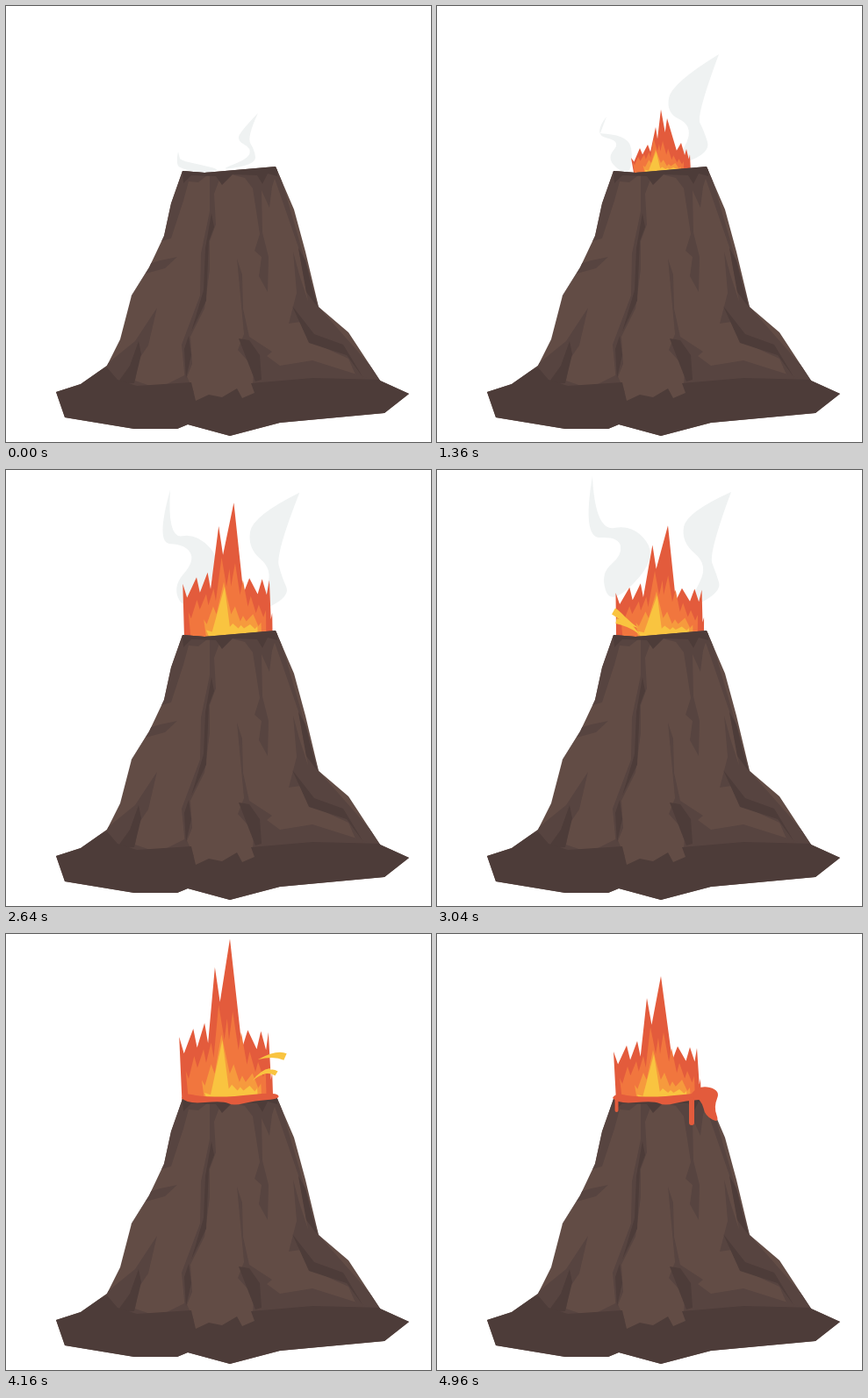
Recreate the animation shown at these times as an HTML page with a canvas. Size 484 px wide and 497 px high, loop 5040 ms.

```html
<!DOCTYPE html>
<html lang="en">
<head>
<meta charset="utf-8">
<title>Volcano</title>
<style>
html, body { margin: 0; width: 100%; height: 100%; overflow: hidden; background: #fff; }
canvas { display: block; }
</style>
</head>
<body>
<canvas id="stage" width="484" height="497"></canvas>
<script>
const ctx = document.getElementById('stage').getContext('2d');
const LOOP = 5040, STEP = 80, BASE = 190;
const RED = '#e35b3c', ORANGE = '#f1763e', AMBER = '#f69a3d', YELLOW = '#f9c440';
const ROCK = '#624c45', SHADE = '#574440', DARK = '#4d3c39', SMOKE = '#eff2f2';

const mix = (a, b, k) => a + (b - a) * k;
const ramp = (t, a, b) => Math.max(0, Math.min(1, (t - a) / (b - a)));
const blend = (a, b, k) => a.map((v, i) => mix(v, b[i], k));

// Blends flat arrays of equal length between key times.
function sample(times, values, t) {
  let i = 0;
  while (i < times.length - 2 && t > times[i + 1]) i++;
  return blend(values[i], values[i + 1], ramp(t, times[i], times[i + 1]));
}

function trace(p) {
  ctx.beginPath();
  for (let i = 0; i < p.length; i += 2) ctx.lineTo(p[i], p[i + 1]);
  ctx.closePath();
}

function poly(color, ...p) {
  ctx.fillStyle = color;
  trace(p);
  ctx.fill();
}

// Smooth outline with one sharp tip at its first point.
function soft(color, p) {
  ctx.fillStyle = color;
  ctx.beginPath();
  ctx.moveTo(p[0], p[1]);
  for (let i = 2; i < p.length - 2; i += 2)
    ctx.quadraticCurveTo(p[i], p[i + 1], (p[i] + p[i + 2]) / 2, (p[i + 1] + p[i + 3]) / 2);
  ctx.quadraticCurveTo(p[p.length - 2], p[p.length - 1], p[0], p[1]);
  ctx.fill();
}

// Mountain
const outline = [201,188, 226,190, 307,183, 328,232, 341,280, 356,343, 390,372, 426,427,
  459,442, 431,464, 312,475, 255,490, 207,477, 195,482, 146,482, 67,469, 57,440, 85,431,
  115,410, 130,380, 143,330, 163,298, 180,262, 188,225];

function drawMountain() {
  ctx.save();
  trace(outline);
  ctx.fillStyle = ROCK;
  ctx.fill();
  ctx.clip();
  // Broad folds
  poly(SHADE, 195,180, 233,190, 219,201, 208,200, 202,222, 188,265, 170,270);
  poly(SHADE, 232,190, 246,190, 237,214, 239,249, 232,268, 232,300, 226,345, 210,377,
    212,408, 204,428, 200,386, 221,330, 222,282, 232,234);
  poly(SHADE, 249,190, 310,184, 303,206, 300,230, 291,210, 292,258, 299,286, 298,326,
    288,308, 291,286, 283,279, 289,260, 281,208, 272,196);
  poly(SHADE, 303,188, 310,185, 356,343, 430,427, 400,425, 390,402, 355,386,
    335,360, 322,362, 331,327, 327,280, 334,306, 344,337, 333,275);
  poly(SHADE, 263,288, 269,306, 270,345, 277,377, 303,394, 297,399, 312,410, 349,404,
    425,428, 281,435, 282,412, 264,392, 271,374);
  poly(SHADE, 195,286, 181,299, 159,305, 140,335, 140,300, 176,290);
  poly(SHADE, 172,344, 162,387, 151,403, 147,427, 173,436, 205,420, 214,440, 80,440,
    115,408, 147,382);
  // Deep creases
  poly(DARK, 234,236, 237,252, 231,268, 228,336, 211,371, 225,324, 227,276);
  poly(DARK, 208,376, 211,398, 205,424, 203,391);
  poly(DARK, 265,379, 277,381, 289,398, 291,426, 284,428);
  poly(DARK, 326,342, 351,374, 384,386, 407,424, 388,398, 345,384);
  poly(DARK, 333,276, 341,290, 354,342, 342,326);
  poly(DARK, 151,382, 154,397, 146,430, 126,431, 141,410);
  poly(DARK, 200,180, 310,180, 309,194, 298,191, 292,203, 286,193, 258,192, 246,204,
    239,194, 211,193, 202,202);
  // Foot
  poly(DARK, 50,440, 115,412, 127,426, 149,433, 211,429, 216,450, 231,443, 246,446,
    263,436, 269,447, 283,441, 279,430, 349,424, 470,427, 470,497, 50,497);
  ctx.restore();
}

// Smoke
const rightSmall = [287,122, 266,144, 264,154, 279,162, 276,174, 240,188, 285,180, 283,164, 274,150];
const rightTall = [321,55, 267,88, 261,122, 289,135, 284,162, 255,188, 312,168, 304,142, 295,125];
const rightWide = [332,28, 272,65, 264,112, 288,135, 292,164, 300,174, 322,158, 302,140, 300,95];
const rightBent = [335,25, 284,48, 278,82, 309,108, 290,146, 285,160, 324,138, 318,118, 309,95];
const rightTimes = [0, 560, 1120, 1360, 2080, 2800];
const rightShapes = [rightSmall, blend(rightSmall, rightTall, .36),
  blend(rightSmall, rightTall, .72), rightTall, rightWide, rightBent];

const leftTimes = [0, 1360, 2080, 2800];
const leftSmall = [196,166, 193,181, 202,186, 222,191, 246,187, 222,181, 203,177, 198,174];
const leftTall = [193,126, 177,147, 210,154, 192,175, 220,196, 223,160, 211,148, 186,145];
const leftWide = [222,78, 187,103, 195,116, 230,126, 200,188, 232,188, 235,130, 196,108];
const leftBent = [177,7, 165,78, 207,76, 211,97, 186,118, 198,156, 252,100, 224,62];
leftBent.push(180, 70);
for (const shape of [leftSmall, leftTall, leftWide]) shape.push(...shape.slice(-2));
const leftShapes = [leftSmall, leftTall, leftWide, leftBent];

function drawSmoke(t) {
  ctx.globalAlpha = 1 - ramp(t, 3040, 3400);
  soft(SMOKE, sample(rightTimes, rightShapes, t));
  soft(SMOKE, sample(leftTimes, leftShapes, t));
  ctx.globalAlpha = 1;
}

// Fire: tips are x, height pairs.
const smallTips = [221,17, 231,28, 240,32, 249,52, 255,72, 262,62, 278,34, 284,27, 288,21];
const fullTips = [201,56, 216,63, 228,68, 239,117, 255,142, 274,62, 288,61, 296,60, 300,25];
const orangeTips = [208,26, 217,39, 227,45, 235,51, 243,84, 252,72, 258,78, 267,60, 276,43, 285,34, 293,28];
const amberTips = [225,18, 235,32, 246,58, 259,32, 268,22, 279,24, 288,15];
const yellowTips = [228,7, 247,53, 257,14, 266,12, 276,13, 284,11];

const fireTimes = [960, 1360, 2080, 2480, 3040, 3360, 3760, 4160, 4560, 4960];
// Height, width and lean
const firePoses = [[0, .5, 0], [1, 1, 0], [1, 1, 0], [1.15, 1.04, 3], [.893, 1.03, 8],
  [1.04, 1.04, 6], [.672, 1.07, 6], [1.3, 1.07, 0], [1.04, 1.03, 0], [1, 1, 0]];

// Each valley sits nearer to the lower of its two tips.
function flame(color, tips, high, wide, lean) {
  const p = [];
  const add = (x, h) =>
    p.push(255 + (x - 255) * wide + lean * (.2 + .8 * h / 142), BASE - h * high);
  add(tips[0] + 3, 0);
  for (let i = 0; i < tips.length; i += 2) {
    const [x, h, nextX, nextH] = tips.slice(i, i + 4);
    add(x, h);
    if (nextX) add(mix(x, nextX, h < nextH ? .34 : .68), Math.min(h, nextH) * .74);
  }
  add(tips[tips.length - 2] + 1, 0);
  poly(color, ...p);
}

function drawFire(t) {
  if (t <= 960) return;
  const [high, wide, lean] = sample(fireTimes, firePoses, t);
  const grow = ramp(t, 1360, 2080);
  flame(RED, blend(smallTips, fullTips, grow), high, wide, lean);
  const innerHigh = high * mix(.46, 1, grow), innerWide = wide * mix(.68, 1, grow);
  flame(ORANGE, orangeTips, innerHigh, innerWide, lean);
  flame(AMBER, amberTips, innerHigh, innerWide, lean);
  flame(YELLOW, yellowTips, innerHigh, innerWide, lean);
}

// Thrown lava: curved streaks given by head, bend and tail.
function streak([x0, y0, cx, cy, x1, y1], width) {
  const len = Math.hypot(cx - x0, cy - y0);
  const nx = -(cy - y0) / len * width / 2, ny = (cx - x0) / len * width / 2;
  ctx.fillStyle = YELLOW;
  ctx.beginPath();
  ctx.moveTo(x0 + nx, y0 + ny);
  ctx.quadraticCurveTo(cx + nx, cy + ny, x1, y1);
  ctx.quadraticCurveTo(cx - nx, cy - ny, x0 - nx, y0 - ny);
  ctx.fill();
}

const leftThrow = {
  start: 2880, low: 3040, high: 3760, end: 4000,
  from: [[201,161, 210,166, 232,189], [204,172, 215,174, 230,186], [214,170, 220,176, 229,180]],
  to: [[142,132, 150,119, 168,121], [148,149, 159,142, 174,147], [165,137, 175,136, 185,150]]
};
const rightThrow = {
  start: 3600, low: 3760, high: 4160, end: 4720,
  from: [[291,167, 279,168, 263,188], [290,177, 280,173, 268,187], [280,169, 274,173, 267,182]],
  to: [[318,140, 307,135, 287,143], [308,159, 298,153, 286,164], [301,155, 290,157, 281,167]]
};

// Flight carries on past the upper pose and then falls.
function drawThrow({ start, low, high, end, from, to }, t) {
  if (t < start || t >= end) return;
  const k = (t - low) / (high - low), fall = 45 * Math.max(0, k - 1) ** 2;
  from.forEach((shape, i) => {
    const p = blend(shape, to[i], k).map((v, j) => j % 2 ? v + fall : v);
    streak(p, 8 - 2 * i);
  });
}

// Lava over the rim
function drip(x, width, length) {
  ctx.fillStyle = RED;
  ctx.beginPath();
  ctx.roundRect(x - width / 2, 186, width, length, width / 2);
  ctx.fill();
}

const blobStart = [292,187, 302,181, 311,183, 312,188, 309,191, 305,191, 301,190];
const blobEnd = [290,182, 298,172, 323,178, 315,197, 322,216, 305,207, 302,190];

function drawOverflow(t) {
  const rise = ramp(t, 3960, 4160), flow = ramp(t, 4400, 4960);
  if (!rise) return;
  ctx.save();
  ctx.translate(0, 190 * (1 - rise));
  ctx.scale(1, rise);
  soft(RED, [200,187, 203,181, 220,185, 255,186, 307,180, 313,188, 283,190, 259,196,
    247,190, 206,194]);
  ctx.restore();
  if (!flow) return;
  drip(204.5, 4, mix(5, 17, flow));
  drip(290, 6, mix(5, 32, flow));
  soft(RED, blend(blobStart, blobEnd, flow));
}

function frame(now) {
  const t = Math.floor((now % LOOP) / STEP) * STEP;
  ctx.fillStyle = '#fff';
  ctx.fillRect(0, 0, 484, 497);
  drawSmoke(t);
  drawFire(t);
  drawThrow(leftThrow, t);
  drawThrow(rightThrow, t);
  drawMountain();
  drawOverflow(t);
}

const began = performance.now();
function tick() {
  frame(performance.now() - began);
  requestAnimationFrame(tick);
}
tick();
</script>
</body>
</html>
```
